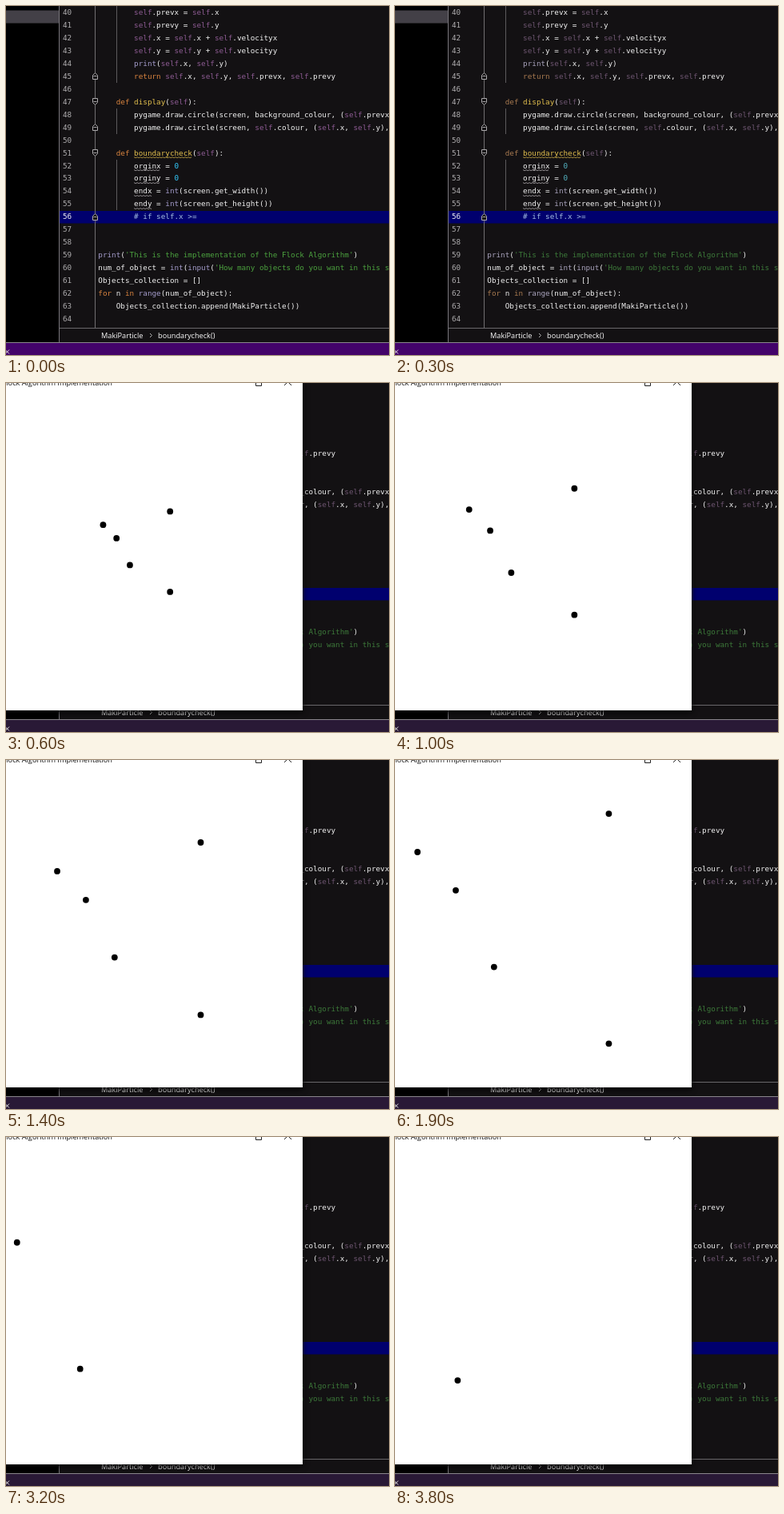
An HTML page with a canvas that plays this animation: 479x436 px, repeating every 3900 ms.

```html
<!DOCTYPE html>
<html>
<head>
<meta charset="utf-8">
<style>
html, body { margin: 0; width: 100%; height: 100%; overflow: hidden; background: #131113; }
canvas { display: block; }
</style>
</head>
<body>
<canvas id="stage" width="479" height="436"></canvas>
<script>
const ctx = document.getElementById('stage').getContext('2d');
const LOOP = 3900, STEP = 100, OPEN_AT = 600;
const CHAR = 5.6, LINE = 15.96, CODE_X = 115.3, FIRST = 40;
const MONO = '9.3px "DejaVu Sans Mono", monospace';
const UI = '9.2px "Open Sans", sans-serif';

const code = `        self.prevx = self.x
        self.prevy = self.y
        self.x = self.x + self.velocityx
        self.y = self.y + self.velocityy
        print(self.x, self.y)
        return self.x, self.y, self.prevx, self.prevy

    def display(self):
        pygame.draw.circle(screen, background_colour, (self.prevx, self.prevy), 5)
        pygame.draw.circle(screen, self.colour, (self.x, self.y), 5)

    def boundarycheck(self):
        orginx = 0
        orginy = 0
        endx = int(screen.get_width())
        endy = int(screen.get_height())
        # if self.x >=


print('This is the implementation of the Flock Algorithm')
num_of_object = int(input('How many objects do you want in this simulation?'))
Objects_collection = []
for n in range(num_of_object):
    Objects_collection.append(MakiParticle())
`.split('\n');

const bright = { comment: '#a3bde0', string: '#4ca33f', self: '#8d5b93', keyword: '#d9843f',
  builtin: '#a59dcc', name: '#e3c04e', number: '#33ccff', plain: '#f2f2f2' };
const dimmed = { ...bright, string: '#3d7a3a', self: '#6d5570', keyword: '#a87a50',
  builtin: '#aaa4bd', number: '#55b5c4' };
const token = /(?<comment>#.*)|(?<string>'[^']*')|(?<self>\bself\b)|(?<keyword>\b(?:def|return|for|in)\b)|(?<builtin>\b(?:print|int|input|range)\b)|(?<name>\b(?:display|boundarycheck)\b)|(?<number>\b\d+\b)|(?<plain>\w+|[^\w\s])/g;

// Foldable lines: 1 opens a block, -1 closes one
const folds = { 45: -1, 47: 1, 49: -1, 51: 1, 56: -1 };
// Indent guides: first and last line of each method body
const guides = [[39, 45], [48, 49], [52, 55]];
const directions = [[2, -3], [-3, -2], [-2, -1], [-1, 1], [2, 3]];

const lineY = n => 8 + (n - FIRST) * LINE;

function rect(color, x, y, w, h) {
  ctx.fillStyle = color;
  ctx.fillRect(x, y, w, h);
}

function text(str, x, y, color, font, align = 'left') {
  ctx.font = font;
  ctx.fillStyle = color;
  ctx.textAlign = align;
  ctx.fillText(str, x, y);
}

function mono(str, x, y, color) {
  [...str].forEach((c, i) => text(c, x + i * CHAR, y, color, MONO));
}

function path(points, color, fill) {
  ctx.beginPath();
  points.forEach(([x, y]) => ctx.lineTo(x, y));
  if (fill) {
    ctx.closePath();
    ctx.fillStyle = fill;
    ctx.fill();
  }
  ctx.strokeStyle = color;
  ctx.lineWidth = 1;
  ctx.stroke();
}

function wave(x, y, width, color) {
  const points = [];
  for (let i = 0; i <= width; i += 2) points.push([x + i, y + (i % 4 ? 0.5 : -0.5)]);
  path(points, color);
}

function foldIcon(y, dir) {
  const shape = [[-3, -4], [3, -4], [3, 1], [0, 4], [-3, 1]]
    .map(([x, dy]) => [111.5 + x, y + dy * dir]);
  path(shape, '#aaa8aa', '#131113');
  path([[109.5, y], [113.5, y]], '#aaa8aa');
}

function drawEditor(t) {
  const colors = t < STEP ? bright : dimmed;
  rect('#131113', 0, 0, 479, 436);
  rect('#000', 0, 0, 66, 420);
  rect('#434047', 0, 5.5, 66, 16);
  rect('#77757a', 66, 0, 1, 420);
  rect('#00006e', 67, 256, 412, 15.5);
  rect('#706e70', 111, 0, 1, 402);
  for (const [from, to] of guides) {
    const top = Math.round(lineY(from) - 8);
    rect('#5c5a5c', 138, top, 1, Math.round(lineY(to) + 8) - top);
  }

  code.forEach((line, i) => {
    const n = FIRST + i, y = lineY(n) + 3;
    if (n < 65) mono(String(n), 71, y, n === 56 ? '#f4f4f4' : '#b0aeb0');
    if (folds[n]) foldIcon(Math.floor(lineY(n)) + 0.5, folds[n]);
    for (const m of line.matchAll(token)) {
      const kind = Object.keys(m.groups).find(k => m.groups[k]);
      const x = CODE_X + m.index * CHAR;
      mono(m[0], x, y, colors[kind]);
      if (/^(orgin|end)[xy]$/.test(m[0])) wave(x, y + 2.7, m[0].length * CHAR, '#8f8b8e');
      if (m[0] === 'boundarycheck') wave(x, y + 2.7, m[0].length * CHAR, '#a38a3c');
    }
  });

  rect('#131113', 67, 402, 412, 18);
  rect('#69676a', 67, 402, 412, 1);
  text('MakiParticle', 119, 415, '#fff', UI);
  path([[180, 409], [182.5, 411.5], [180, 414]], '#b8b8b8');
  text('boundarycheck()', 190, 415, '#fff', UI);
  rect('#8a868c', 0, 420, 479, 1);
  rect(t < OPEN_AT ? '#43036a' : '#291936', 0, 421, 479, 15);
  path([[-1, 429.5], [4, 434.5]], '#e8e8e8');
  path([[-1, 434.5], [4, 429.5]], '#e8e8e8');
}

function drawWindow(t) {
  ctx.save();
  ctx.shadowColor = '#000';
  ctx.shadowBlur = 7;
  ctx.shadowOffsetY = 2;
  rect('#fff', -28, -20, 399, 429);
  ctx.restore();

  text('Flock Algorithm Implementation', 133, 2.5, '#111', UI, 'right');
  path([[312.5, -5], [312.5, 3.5], [319.5, 3.5], [319.5, -5]], '#222');
  path([[348, -6], [357, 3]], '#222');
  path([[357, -6], [348, 3]], '#222');

  ctx.save();
  ctx.beginPath();
  ctx.rect(0, 11, 371, 398);
  ctx.clip();
  const travel = 2.393 * (Math.floor(t / STEP) + 1);
  ctx.fillStyle = '#000';
  for (const [dx, dy] of directions) {
    ctx.beginPath();
    ctx.arc(171.7 + dx * travel, 210.7 + dy * travel, 3.9, 0, 7);
    ctx.fill();
  }
  ctx.restore();
}

function frame() {
  const t = performance.now() % LOOP;
  drawEditor(t);
  if (t >= OPEN_AT) drawWindow(t);
  requestAnimationFrame(frame);
}
frame();
</script>
</body>
</html>
```
